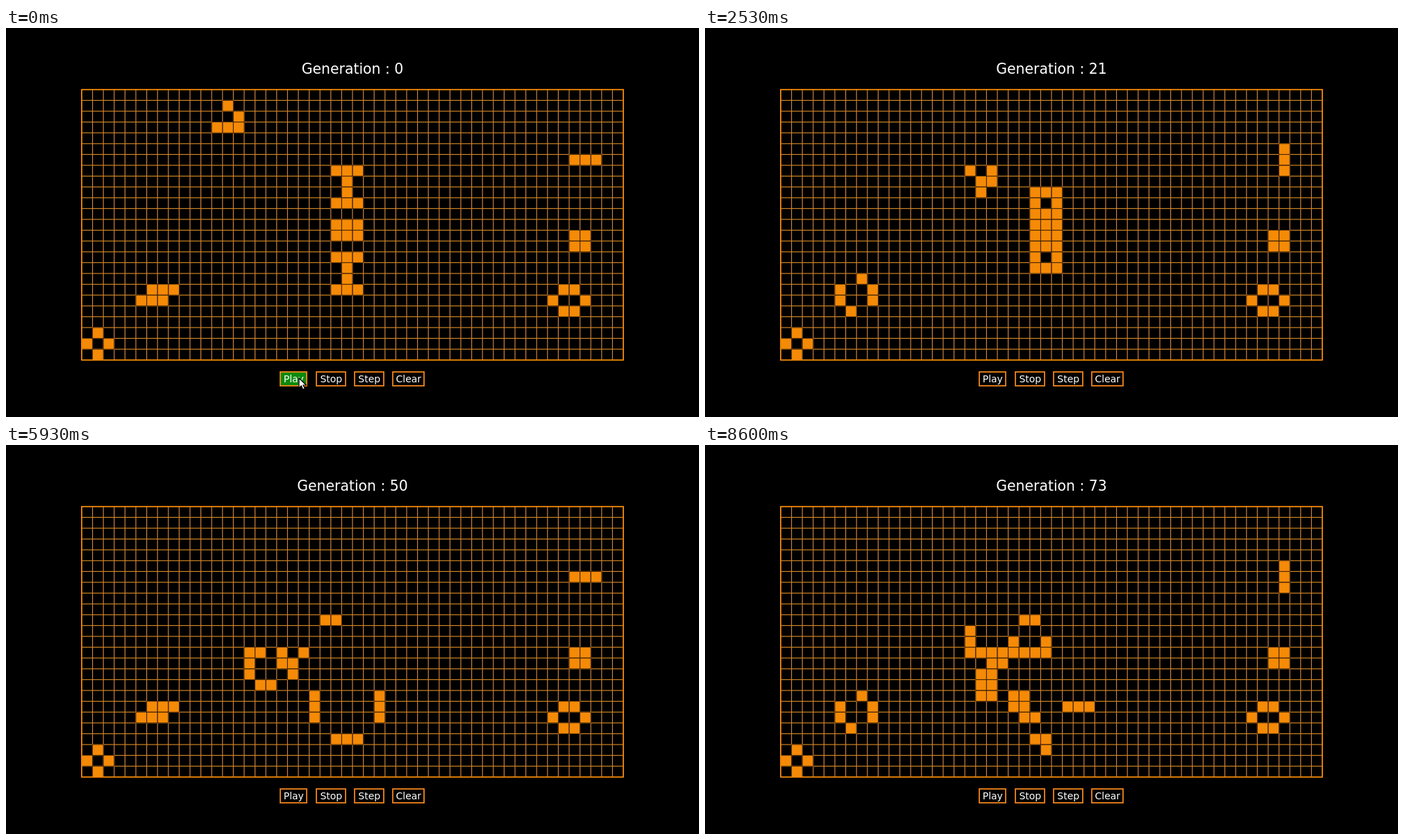
These frames come from a looping animation (998x561 px, 8.67 s). An HTML page with a canvas:

```html
<!DOCTYPE html>
<html lang="en">
<head>
<meta charset="utf-8">
<title>Game of Life</title>
<style>
  html, body { margin: 0; width: 100%; height: 100%; overflow: hidden; background: #000; }
  canvas { display: block; width: 998px; height: 561px; }
</style>
</head>
<body>
<canvas id="stage" width="998" height="561"></canvas>
<script>
const ctx = document.getElementById('stage').getContext('2d');
const COLS = 50, ROWS = 25, SIZE = 15.6;
const LEFT = 109, TOP = 88.8, WIDTH = COLS * SIZE, HEIGHT = ROWS * SIZE;
const LOOP = 8670, LAST_GEN = 73;
const ORANGE = '#f58a07', SEAM = '#4a2808';
const FONT = '"DejaVu Sans", Verdana, sans-serif';

// column, row, rows of the pattern separated by slashes
const SEEDS = [
  [12, 1, '.#./..#/###'],
  [45, 6, '###'],
  [23, 7, '###/.#./.#./###/.../###/###/.../###/.#./.#./###'],
  [45, 13, '##/##'],
  [5, 18, '.###/###.'],
  [43, 18, '.##./#..#/.##.'],
  [0, 22, '.#./#.#/.#.'],
];

// label, left edge, width
const BUTTONS = [['Play', 394, 40], ['Stop', 446, 44], ['Step', 501, 44], ['Clear', 556, 47]];

// pointer tip at each tick before it leaves
const POINTER = [[422, 505], [423, 508], [424, 511]];

const lineX = c => LEFT + c * SIZE;
const lineY = r => TOP + r * SIZE;

function seedGrid() {
  const grid = new Uint8Array(COLS * ROWS);
  for (const [col, row, shape] of SEEDS)
    shape.split('/').forEach((line, r) =>
      [...line].forEach((ch, c) => {
        if (ch === '#') grid[(row + r) * COLS + col + c] = 1;
      }));
  return grid;
}

function neighbours(grid, col, row) {
  let sum = 0;
  for (let r = row - 1; r <= row + 1; r++)
    for (let c = col - 1; c <= col + 1; c++) {
      const inside = r >= 0 && r < ROWS && c >= 0 && c < COLS;
      if (inside && (r !== row || c !== col)) sum += grid[r * COLS + c];
    }
  return sum;
}

function nextGrid(grid) {
  return grid.map((alive, i) => {
    const n = neighbours(grid, i % COLS, Math.floor(i / COLS));
    return n === 3 || (alive && n === 2) ? 1 : 0;
  });
}

const history = [seedGrid()];
while (history.length <= LAST_GEN) history.push(nextGrid(history[history.length - 1]));

// The picture refreshes 15 times a second, on times rounded to 10 ms.
function tickAt(ms) {
  const rest = ms % 200;
  return Math.floor(ms / 200) * 3 + (rest >= 130 ? 2 : rest >= 70 ? 1 : 0);
}

const startTick = gen => Math.floor(2.32 + 1.7463 * gen);

function generationAt(tick) {
  let gen = 0;
  while (gen < LAST_GEN && startTick(gen + 1) <= tick) gen++;
  return gen;
}

function text(str, x, y, size) {
  ctx.font = `${size}px ${FONT}`;
  ctx.textAlign = 'center';
  ctx.fillStyle = '#fff';
  ctx.fillText(str, x, y);
}

function box(x, y, w, h, color, weight) {
  ctx.strokeStyle = color;
  ctx.lineWidth = weight;
  ctx.strokeRect(x, y, w, h);
}

function drawLines() {
  ctx.fillStyle = '#c98042';
  for (let c = 1; c < COLS; c++) ctx.fillRect(lineX(c) - 0.6, TOP, 1.2, HEIGHT);
  ctx.fillStyle = '#cf8424';
  for (let r = 1; r < ROWS; r++) ctx.fillRect(LEFT, lineY(r) - 0.6, WIDTH, 1.2);
}

function drawCells(grid) {
  const alive = [];
  grid.forEach((on, i) => {
    if (on) alive.push([lineX(i % COLS), lineY(Math.floor(i / COLS))]);
  });
  ctx.fillStyle = ORANGE;
  for (const [x, y] of alive) ctx.fillRect(x, y, SIZE, SIZE);
  for (const [x, y] of alive) box(x, y, SIZE, SIZE, SEAM, 1);
}

function drawButtons(hover) {
  for (const [label, x, w] of BUTTONS) {
    if (hover && label === 'Play') {
      ctx.fillStyle = '#0b8a0b';
      ctx.fillRect(x, 495, w, 22);
    }
    box(x + 1, 496, w - 2, 20, '#f0841c', 1.8);
    text(label, x + w / 2 + 0.3, 510.7, 14);
  }
}

function drawPointer([x, y]) {
  ctx.save();
  ctx.translate(x, y);
  const arrow = new Path2D('M0 0V14L3.3 11L5.6 16.2L8.2 15.1L5.9 10H10.3Z');
  ctx.fillStyle = '#fff';
  ctx.strokeStyle = '#000';
  ctx.lineWidth = 1.2;
  ctx.fill(arrow);
  ctx.stroke(arrow);
  ctx.restore();
}

function draw(ms) {
  const tick = tickAt(ms);
  const gen = generationAt(tick);
  const pointer = POINTER[tick];
  ctx.fillStyle = '#000';
  ctx.fillRect(0, 0, 998, 561);
  text('Generation : ' + gen, 499, 65.5, 20.4);
  drawLines();
  drawCells(history[gen]);
  box(LEFT, TOP, WIDTH, HEIGHT, ORANGE, 1.8);
  drawButtons(Boolean(pointer));
  if (pointer) drawPointer(pointer);
}

const start = performance.now();
function loop() {
  draw((performance.now() - start) % LOOP);
  requestAnimationFrame(loop);
}
loop();
</script>
</body>
</html>
```
